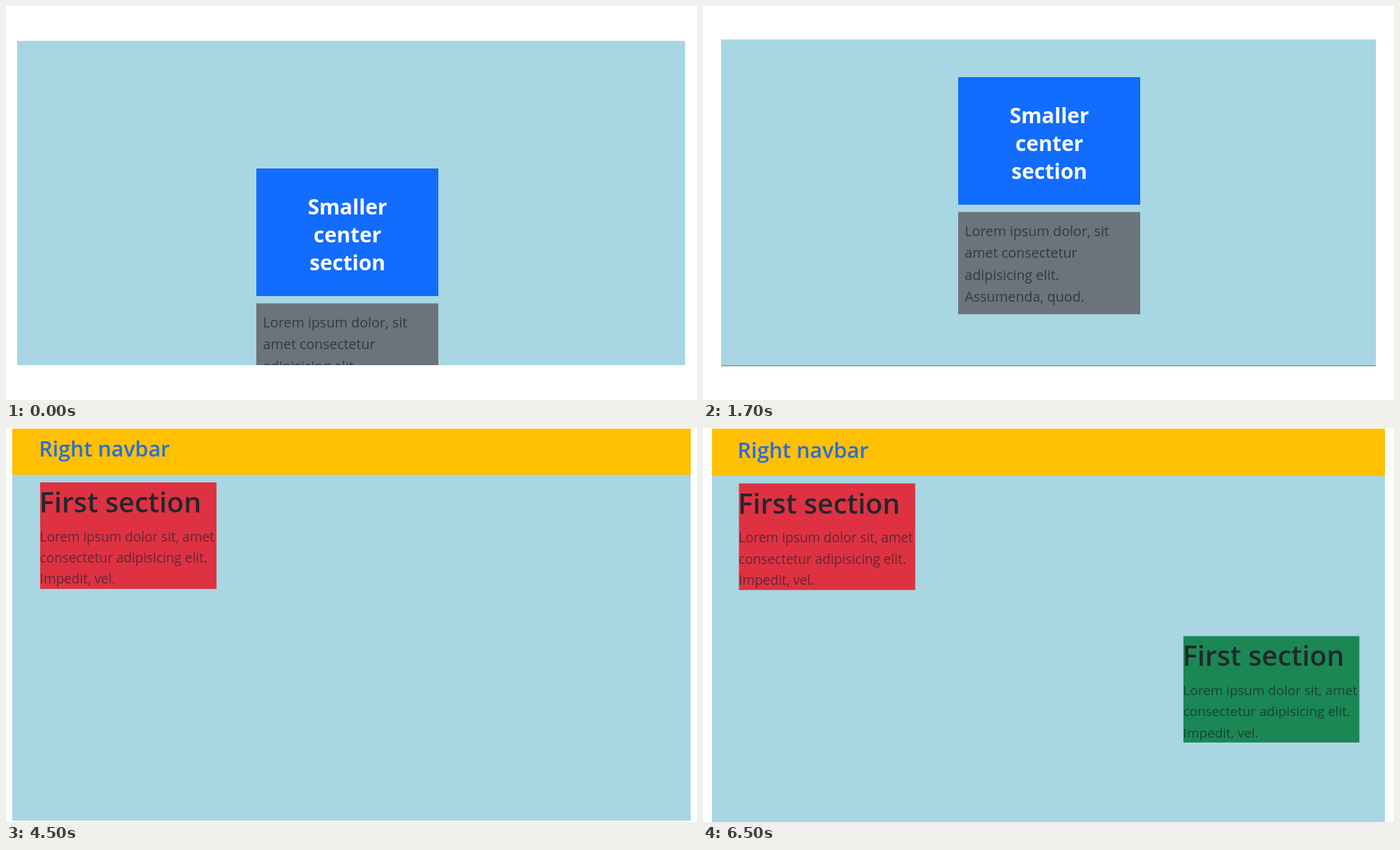
These frames come from a looping animation (991 px wide and 565 px high, 8000 ms). An HTML page with a canvas:

```html
<!DOCTYPE html>
<html lang="en">
<head>
<meta charset="utf-8">
<title>Layout sections</title>
<style>
  html, body { margin: 0; width: 100%; height: 100%; overflow: hidden; background: #fff; }
  canvas { display: block; width: 991px; height: 565px; }
</style>
</head>
<body>
<canvas id="stage" width="991" height="565"></canvas>
<script>
const ctx = document.getElementById('stage').getContext('2d');
const FAMILY = '"Open Sans", "Noto Sans", sans-serif';
const LOOP = 8000;
const SKY = '#a8d6e2', BLUE = '#126cfd', GRAY = '#6b737b', YELLOW = '#fec000';
const RED = '#de3243', GREEN = '#1b8755', INK = '#22272b';

function box(color, left, top, right, bottom) {
  ctx.fillStyle = color;
  ctx.fillRect(left, top, right - left, bottom - top);
}

function write(lines, x, y, { size, weight = 400, color = INK, pitch = 0, align = 'left' }) {
  ctx.font = `${weight} ${size}px ${FAMILY}`;
  ctx.fillStyle = color;
  ctx.textAlign = align;
  lines.forEach((line, i) => ctx.fillText(line, x, y + i * pitch));
}

// Blue title card with the gray paragraph card below it
function centerCards(x, y) {
  box(BLUE, x, y, x + 261, y + 183);
  write(['Smaller', 'center', 'section'], x + 130.7, y + 65.5,
    { size: 30.1, weight: 700, color: '#fff', pitch: 40, align: 'center' });
  box(GRAY, x, y + 193.5, x + 261, y + 340);
  write(['Lorem ipsum dolor, sit', 'amet consectetur', 'adipisicing elit.', 'Assumenda, quod.'],
    x + 9.5, y + 228, { size: 19.75, color: '#343a41', pitch: 31.4 });
}

function navbar(left, top, right, bottom, x, y, scale) {
  box(YELLOW, left, top, right, bottom);
  write(['Right navbar'], x, y, { size: 31.6 * scale, weight: 600, color: '#2a6dd6' });
}

function section(color, textColor, x, y, scale) {
  ctx.save();
  ctx.translate(x, y);
  ctx.scale(scale, scale);
  box(color, 0, 0, 261.5, 158);
  write(['First section'], -1.2, 44.5, { size: 41, weight: 600 });
  write(['Lorem ipsum dolor sit, amet', 'consectetur adipisicing elit.', 'Impedit, vel.'],
    -0.4, 87.7, { size: 19.7, color: textColor, pitch: 31.3 });
  ctx.restore();
}

const redSection = (x, y, scale) => section(RED, '#642633', x, y, scale);
const greenSection = (x, y, scale) => section(GREEN, '#1b4233', x, y, scale);

const scenes = [
  { until: 500, draw() {
    ctx.save();
    ctx.beginPath();
    ctx.rect(16, 50, 958, 465);
    ctx.clip();
    box(SKY, 16, 50, 974, 515);
    centerCards(359, 233);
    ctx.restore();
  } },
  { until: 2500, draw() {
    box(SKY, 26, 48, 965, 516);
    box('#5d767f', 26, 515.5, 965, 516.5);
    centerCards(366, 102);
  } },
  { until: 4500, draw() {
    box(SKY, 2, 1, 979, 464);
    navbar(2, 102, 979, 174, 29.5, 147, 1);
    redSection(31, 185, 1);
  } },
  { until: 6500, draw() {
    box(SKY, 9, 1, 982, 563);
    navbar(9, 1, 982, 67, 47.3, 41, 0.967);
    redSection(49, 78, 0.967);
  } },
  { until: LOOP, draw() {
    box(SKY, 13, 1, 978, 565);
    navbar(13, 1, 978, 68.5, 49.6, 42.5, 0.967);
    redSection(51.5, 79.5, 0.967);
    greenSection(689, 298.5, 0.965);
  } }
];

function frame() {
  const time = performance.now() % LOOP;
  box('#fff', 0, 0, 991, 565);
  scenes.find(scene => time < scene.until).draw();
  requestAnimationFrame(frame);
}
frame();
</script>
</body>
</html>
```
